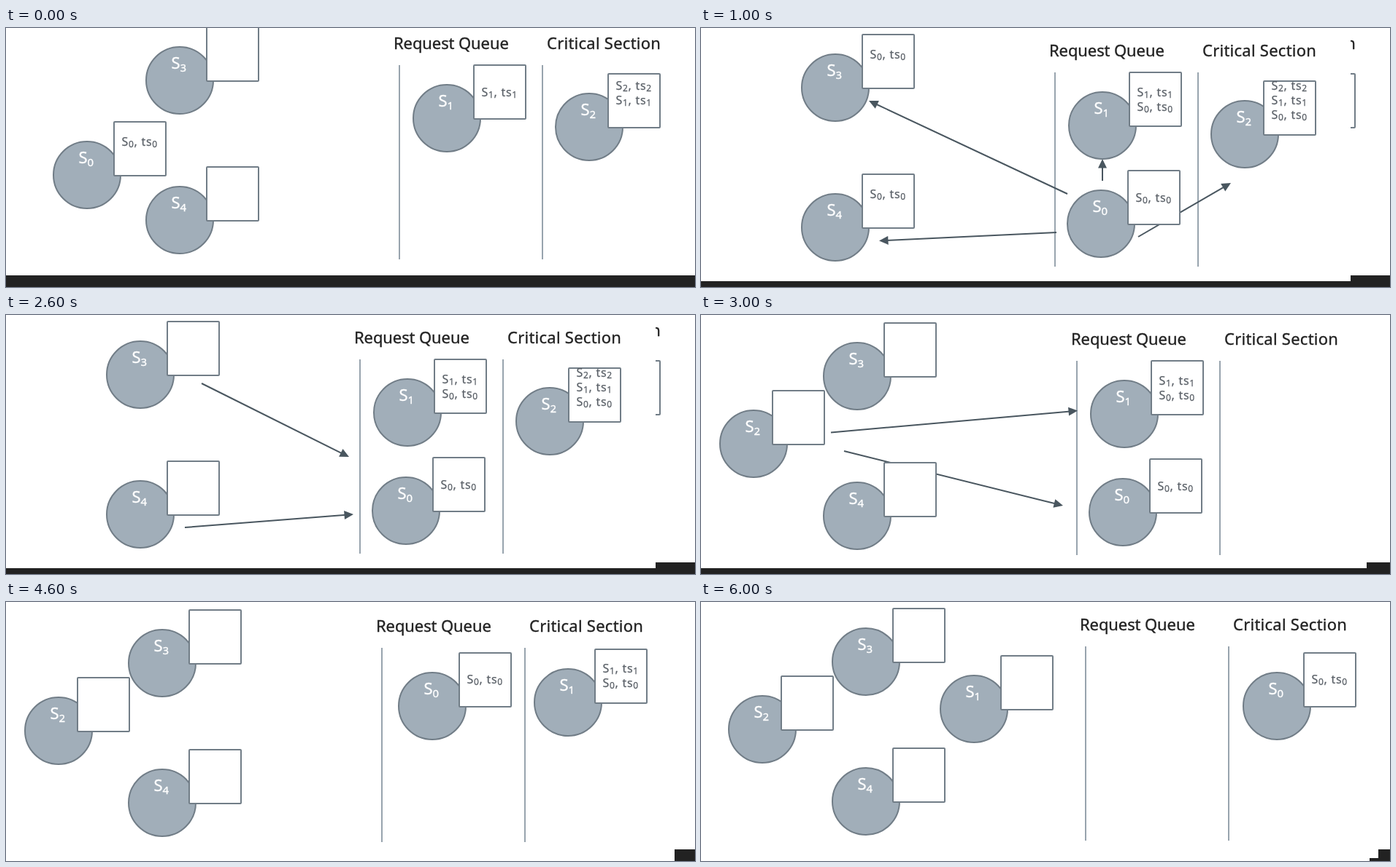
An HTML page that plays this animation: 944 px wide and 356 px high, repeating every 7000 ms.

```html
<!DOCTYPE html>
<html lang="en">
<head>
<meta charset="utf-8">
<title>Mutual exclusion queue</title>
<style>
  html, body { margin: 0; width: 100%; height: 100%; overflow: hidden; background: #fff; }
  svg { display: block; width: 944px; height: 356px; font-family: "Noto Sans", "Open Sans", sans-serif; }
  .cover { fill: #fff; }
  .bar { fill: #222; }
  .rule { stroke: #98a4ae; stroke-width: 2; }
  .disc { fill: #a1aeb9; stroke: #717d87; stroke-width: 2; }
  .box { fill: #fff; stroke: #717d87; stroke-width: 2; }
  .arrow { stroke: #49565f; stroke-width: 2; }
  .head { fill: #49565f; }
  .title { font-size: 22px; fill: #222; stroke: #222; stroke-width: .35; }
  .name { font-size: 22px; fill: #fff; stroke: #fff; stroke-width: .35; }
  .name .sub { font-size: 15px; }
  .note { font-size: 16px; letter-spacing: .7px; fill: #5b6168; stroke: #5b6168; stroke-width: .25; }
  .note .sub { font-size: 12px; }
</style>
</head>
<body>
<svg id="stage" viewBox="0 0 944 356"></svg>
<script>
const STEP = 1000;
const stage = document.getElementById('stage');

function add(parent, tag, attrs, text) {
  const el = document.createElementNS('http://www.w3.org/2000/svg', tag);
  for (const key in attrs) el.setAttribute(key, attrs[key]);
  if (text) el.textContent = text;
  parent.appendChild(el);
  return el;
}

// Digits become subscripts.
function subText(parent, cls, x, y, str, drop) {
  const text = add(parent, 'text', { class: cls, x, y });
  let low = false;
  for (const part of str.match(/\d+|\D+/g)) {
    const sub = /\d/.test(part);
    const dy = sub === low ? 0 : sub ? drop : -drop;
    add(text, 'tspan', sub ? { class: 'sub', dy } : { dy }, part);
    low = sub;
  }
}

function drawColumns(g) {
  for (const x of [0, 196]) add(g, 'line', { class: 'rule', x1: x, y1: 0, x2: x, y2: 267 });
  add(g, 'text', { class: 'title', x: -8, y: -22, 'letter-spacing': -.1 }, 'Request Queue');
  add(g, 'text', { class: 'title', x: 202, y: -22, 'letter-spacing': .25 }, 'Critical Section');
}

function drawArrow(g, [x1, y1, x2, y2]) {
  const len = Math.hypot(x2 - x1, y2 - y1);
  const angle = Math.atan2(y2 - y1, x2 - x1) * 180 / Math.PI;
  const a = add(g, 'g', { transform: `translate(${x1} ${y1}) rotate(${angle})` });
  add(a, 'line', { class: 'arrow', x1: 0, y1: 0, x2: len - 10, y2: 0 });
  add(a, 'path', { class: 'head', d: `M${len} 0l-12.5 -6v12z` });
}

// Notes list the queued requests; noteY is the first baseline from the centre.
function drawNode(g, { id, x, y, notes = [], noteY = -40 }) {
  const n = add(g, 'g', { transform: `translate(${x} ${y})` });
  const left = id === 2 ? 26 : 37;
  add(n, 'circle', { class: 'disc', r: 46 });
  subText(n, 'name', -11.5, -16, 'S' + id, 4);
  add(n, 'rect', { class: 'box', x: left, y: -73, width: 71, height: 74, rx: 1 });
  notes.forEach((k, i) => subText(n, 'note', left + 10.5, noteY + 20 * i, `S${k}, ts${k}`, 2));
}

const node = (id, x, y, notes, noteY) => ({ id, x, y, notes, noteY });
const s3 = notes => node(3, -301, 21, notes);
const s4 = notes => node(4, -301, 213, notes);
const s2Idle = node(2, -443, 114);
const s1Idle = node(1, -153, 86);
const s1Waiting = node(1, 65, 73, [1, 0]);
const s0Waiting = node(0, 63, 208, [0], -30);
const s0First = noteY => node(0, 69, 80, [0], noteY);
const s2Critical = (notes, noteY) => node(2, 260, 85, notes, noteY);

const scenes = [
  { at: [539, 51], cover: [944, 340],
    nodes: [s3(), s4(), node(0, -428, 151, [0]), node(1, 65, 73, [1], -30), s2Critical([2, 1], -51)] },
  { at: [485, 61], cover: [890, 348],
    arrows: [[17, 167, -255, 39], [2, 220, -241, 231.5], [65, 149, 65, 119], [114, 226, 241, 152]],
    nodes: [s3([0]), s4([0]), s1Waiting, s0Waiting, s2Critical([2, 1, 0], -61)] },
  { at: [485, 61], cover: [890, 348],
    arrows: [[-217, 33, -15, 134], [-240, 231, -9, 213]],
    nodes: [s3(), s4(), s1Waiting, s0Waiting, s2Critical([2, 1, 0], -61)] },
  { at: [515, 63], cover: [912, 348],
    arrows: [[-337, 98.5, 1, 68.5], [-319, 124, -19, 199]],
    nodes: [s3(), s4(), s2Idle, s1Waiting, s0Waiting] },
  { at: [515, 63], cover: [916, 356],
    nodes: [s3(), s4(), s2Idle, s0First(-31), node(1, 255, 75, [1, 0], -41)] },
  { at: [527, 61], cover: [928, 352],
    arrows: [[-107, 114, 23, 105]],
    nodes: [s3(), s4(), s2Idle, s1Idle, s0First(-31)] },
  { at: [527, 61], cover: [928, 352],
    nodes: [s3(), s4(), s2Idle, s1Idle, node(0, 262, 82, [0], -31)] }
];

add(stage, 'rect', { class: 'bar', x: 0, y: 340, width: 944, height: 16 });

// Each scene covers only part of the one below, so its edges stay visible.
const layers = scenes.map(({ at, cover, arrows = [], nodes }) => {
  const layer = add(stage, 'g', {});
  add(layer, 'rect', { class: 'cover', x: 0, y: 0, width: cover[0], height: cover[1] });
  const g = add(layer, 'g', { transform: `translate(${at})` });
  drawColumns(g);
  arrows.forEach(a => drawArrow(g, a));
  nodes.forEach(n => drawNode(g, n));
  return layer;
});

function render() {
  const step = Math.floor(performance.now() / STEP) % scenes.length;
  layers.forEach((layer, i) => layer.setAttribute('display', i <= step ? 'inline' : 'none'));
  requestAnimationFrame(render);
}
render();
</script>
</body>
</html>
```
